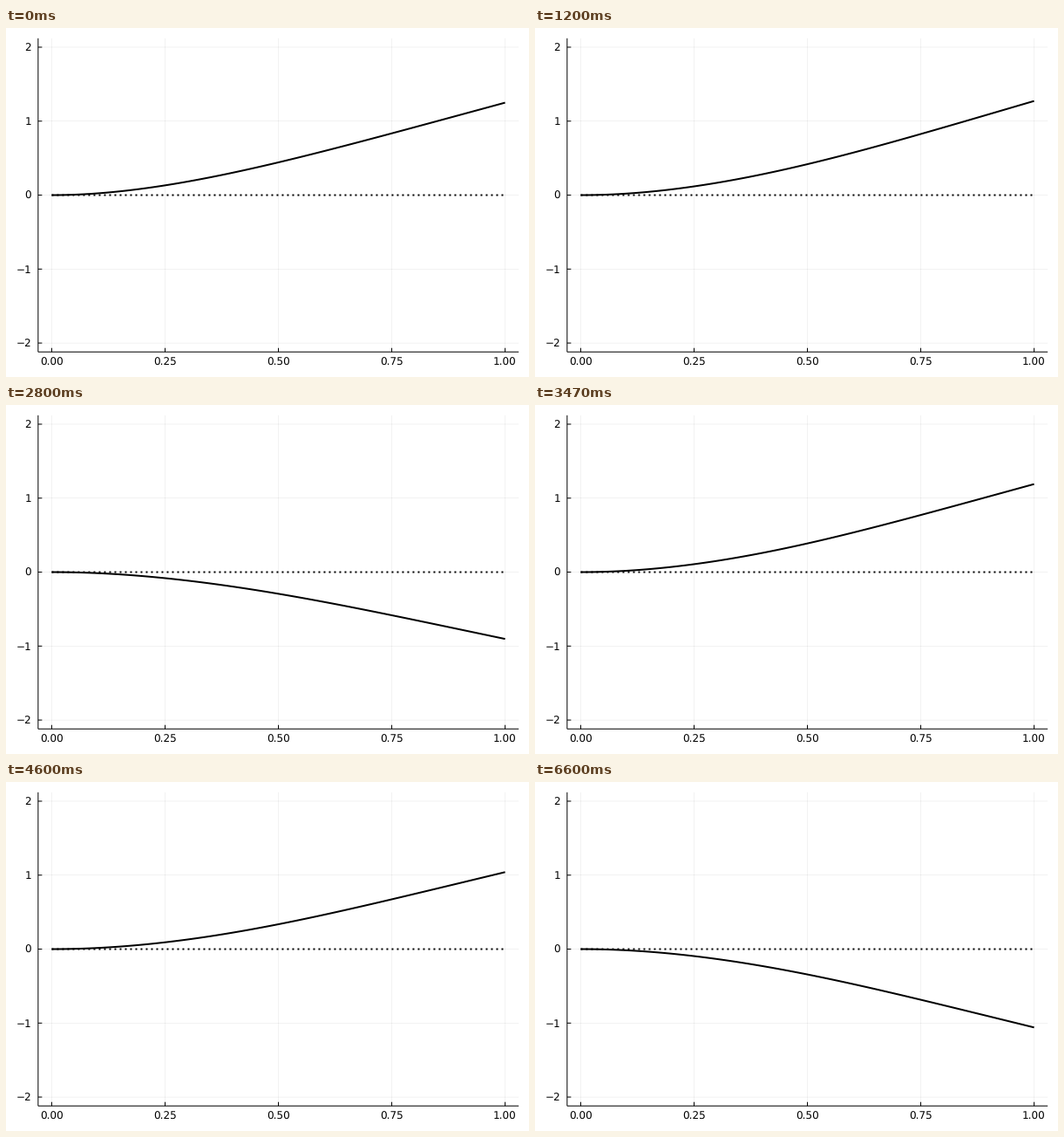
Write a matplotlib script that moves like this. It is 600 by 400 pixels and loops after 6670 ms.

```python
"""Free vibration of a cantilever beam released from its uniformly loaded shape."""
import numpy as np
import matplotlib.pyplot as plt
from matplotlib.animation import FuncAnimation

W, H, DPI = 600, 400, 100
TICK_MS, TICKS = 10, 667
FPS, POSES = 15, 100
DURATION = 10.0
LOAD = 10.0
MODES = 6

LEFT, RIGHT, TOP, BOTTOM = 36.85, 588.19, 11.81, 371.25
XLIM, YLIM = (-0.03, 1.03), (-2.12, 2.12)
TICK_LEN = 4.5
PX = 72 / DPI  # points per pixel

plt.rcParams.update({
    "font.family": "DejaVu Sans",
    "font.size": 12 * PX,
    "text.hinting": "no_hinting",
    "text.hinting_factor": 1,
})


def wave_numbers(n):
    """Roots of cos(b) cosh(b) = -1."""
    b = (np.arange(1, n + 1) - 0.5) * np.pi
    for _ in range(20):
        f = np.cos(b) + 1 / np.cosh(b)
        df = -np.sin(b) - np.tanh(b) / np.cosh(b)
        b = b - f / df
    return b


def mode_shapes(b, x):
    s = ((np.cosh(b) + np.cos(b)) / (np.sinh(b) + np.sin(b)))[:, None]
    bx = np.outer(b, x)
    shape = np.cosh(bx) - np.cos(bx) - s * (np.sinh(bx) - np.sin(bx))
    weight = LOAD * 2 * s / b[:, None] ** 5
    return weight * shape


x = np.linspace(0, 1, 101)
beta = wave_numbers(MODES)
shapes = mode_shapes(beta, x)


def deflection(t):
    return np.cos(beta**2 * t) @ shapes


def px_x(v):
    return LEFT + (v - XLIM[0]) / (XLIM[1] - XLIM[0]) * (RIGHT - LEFT)


def px_y(v):
    return BOTTOM - (v - YLIM[0]) / (YLIM[1] - YLIM[0]) * (BOTTOM - TOP)


# The axes span the whole stage in pixels, with y pointing down.
fig = plt.figure(figsize=(W / DPI, H / DPI), dpi=DPI, facecolor="white")
ax = fig.add_axes([0, 0, 1, 1])
ax.set(xlim=(0, W), ylim=(H, 0))
ax.axis("off")

x_values = np.linspace(0, 1, 5)
y_values = np.arange(-2, 3)
xs, ys = px_x(x_values), px_y(y_values)

grid = dict(color="black", alpha=0.1, linewidth=0.5 * PX, snap=False)
ax.vlines(xs, TOP, BOTTOM, **grid)
ax.hlines(ys, LEFT, RIGHT, **grid)

frame = dict(color="black", linewidth=PX, snap=False)
ax.vlines(xs, BOTTOM - TICK_LEN, BOTTOM, **frame)
ax.hlines(ys, LEFT, LEFT + TICK_LEN, **frame)
ax.vlines(LEFT, TOP, BOTTOM, **frame)
ax.hlines(BOTTOM, LEFT, RIGHT, **frame)

for v, px in zip(x_values, xs):
    ax.text(px - 0.2, 387, f"{v:.2f}", ha="center", va="baseline")
for v, py in zip(y_values, ys):
    ax.text(29, py + 4.4, f"{v}".replace("-", "\u2212"), ha="right", va="baseline")

stroke = dict(color="black", linewidth=2 * PX, snap=False)
ax.plot(px_x(np.array([0, 1])), [px_y(0)] * 2, linestyle=(0, (1, 2)),
        dash_capstyle="butt", **stroke)
beam, = ax.plot(px_x(x), px_y(deflection(0)), solid_capstyle="butt", **stroke)


def update(tick):
    pose = int((tick + 0.5) * TICK_MS * FPS / 1000)
    beam.set_ydata(px_y(deflection(DURATION * pose / (POSES - 1))))
    return beam,


anim = FuncAnimation(fig, update, frames=TICKS, interval=TICK_MS,
                     repeat=True, repeat_delay=0, blit=False)
plt.show()
```
